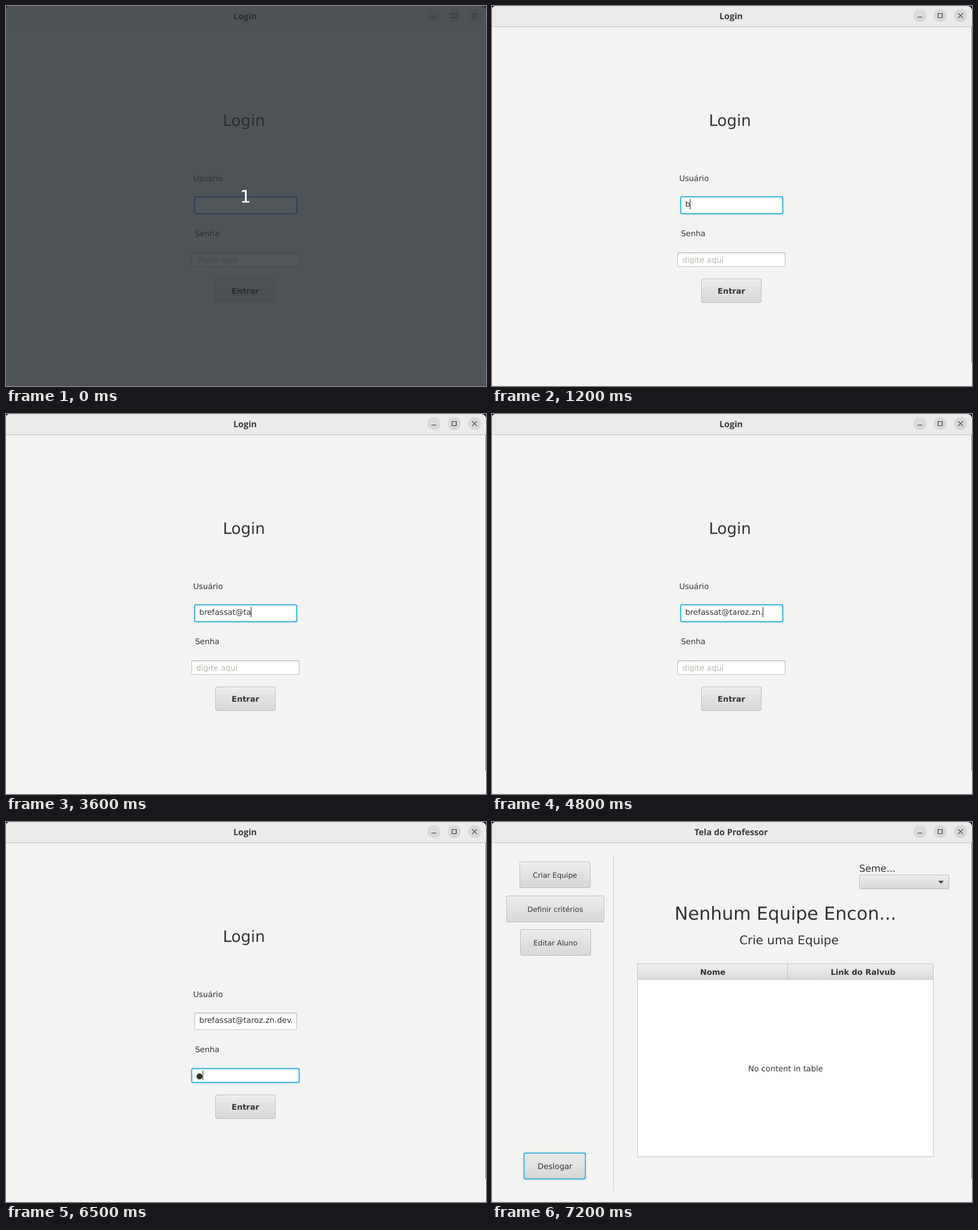
These frames come from a looping animation (800 px wide and 634 px high, 8000 ms). An HTML page:

```html
<!DOCTYPE html>
<html lang="pt">
<head>
<meta charset="utf-8">
<title>Login</title>
<style>
html, body { margin: 0; width: 100%; height: 100%; overflow: hidden; background: #1c1c1c; }
svg { display: block; width: 800px; height: 634px; }
text { font: 13px "DejaVu Sans", sans-serif; fill: #333; text-rendering: geometricPrecision; white-space: pre; }
.bold { font-weight: bold; }
.mid { text-anchor: middle; }
.title { font: bold 14.4px "Open Sans", sans-serif; fill: #3a3a3a; }
.icon { fill: none; stroke: #3a3a3a; stroke-width: 1.2; }
.off { display: none; }
.ring { fill: #039ed3; }
.dim .ring { fill: #1464ff; }
</style>
</head>
<body>
<svg id="stage" viewBox="0 0 800 634" xmlns="http://www.w3.org/2000/svg"></svg>
<script>
const grad = (id, ...stops) => `<linearGradient id="${id}" x2="0" y2="1">` +
  stops.map(([at, c]) => `<stop offset="${at}" stop-color="${c}"/>`).join('') + '</linearGradient>';

const clip = (id, x, y, w, h) =>
  `<clipPath id="${id}"><rect x="${x}" y="${y}" width="${w}" height="${h}"/></clipPath>`;

const label = (str, x, y, size = 13, cls = '', id = '') =>
  `<text id="${id}" class="${cls}" x="${x}" y="${y}"${size === 13 ? '' : ` style="font-size:${size}px"`}>${str}</text>`;

// Stacked rounded rectangles; each layer is [inset, radius, fill].
const layers = (x, y, w, h, list) => list.map(([i, r, fill]) =>
  `<rect x="${x + i}" y="${y + i}" width="${w - 2 * i}" height="${h - 2 * i}" rx="${r}" ` +
  (fill === 'ring' ? 'class="ring"/>' : `fill="${fill}"/>`)).join('');

const group = (id, inner, cls = '') => `<g id="${id}" class="${cls}">${inner}</g>`;

const white = '#fffffe', halo = 'rgba(3,158,211,.133)';
const field = (...r) => layers(...r, [[0, 3, 'url(#edge)'], [1, 2, 'url(#inner)']]);
const fieldFocus = (...r) => layers(...r, [[-.2, 3, 'ring'], [1, 2, white], [-1.4, 4, halo], [3, 0, white]]);
const button = (...r) => layers(...r, [[0, 3, '#b4b4b2'], [1, 2, 'url(#shine)'], [2, 1, 'url(#face)']]);
const buttonFocus = (face, ...r) => layers(...r,
  [[-.2, 3, 'ring'], [1, 2, 'url(#shine)'], [2, 1, face], [-1.4, 4, halo], [2.6, 1, face]]);

const userBox = [314, 318, 171, 29], passBox = [309, 411, 180, 24], enterBox = [349, 455, 100, 40];

const defs = '<defs>' +
  grad('edge', [0, '#b3b3b1'], [1, '#c6c6c4']) +
  grad('inner', [0, '#ebebea'], [.2, white]) +
  grad('shine', [0, '#fbfbfa'], [1, '#dfdfdd']) +
  grad('face', [0, '#ebebe9'], [1, '#d8d8d6']) +
  grad('pressed', [0, '#dadad8'], [1, '#c9c9c7']) +
  grad('head', [0, '#efefed'], [1, '#dbdbd9']) +
  clip('userClip', 322, 318, 155, 29) + clip('passClip', 317, 411, 164, 24) + '</defs>';

const chrome =
  '<rect width="800" height="634" fill="#1c1c1c"/>' +
  '<rect x="-2" width="802" height="660" rx="9" fill="#f3f3f1"/>' +
  '<path d="M0 34V4Q2 0 7 0H791Q800 0 800 9V34Z" fill="#ebebe9"/>' +
  '<rect y="34" width="800" height="1" fill="#bfbfbd"/>' +
  '<rect x="799" y="35" width="1" height="560" fill="#858583"/>' +
  [713, 747, 781].map(x => `<circle cx="${x}" cy="16" r="11" fill="#d9d9d7"/>`).join('') +
  '<path class="icon" d="M709 18.5h8M743.5 12.5h7v7h-7zM777.2 12.2l7.6 7.6M784.8 12.2l-7.6 7.6"/>' +
  label('Login', 398.5, 22, 13, 'title mid', 'title');

const login = group('login',
  label('Login', 361.5, 200, 26) +
  label('Usuário', 312, 292) +
  group('userIdle', field(...userBox)) + group('userFocus', fieldFocus(...userBox)) +
  '<g clip-path="url(#userClip)">' + label('', 322, 335, 13, '', 'user') +
  '<rect id="caret" y="322" width="1" height="17" fill="#222"/></g>' +
  label('Senha', 315, 384) +
  group('passIdle', field(...passBox)) + group('passFocus', fieldFocus(...passBox)) +
  group('prompt', '<text x="317" y="428" style="fill:#b4b6ac">digite aqui</text>') +
  '<circle id="dot" cx="322.5" cy="424.5" r="5" fill="#333"/>' +
  '<g clip-path="url(#passClip)"><rect id="passCaret" y="415" width="1" height="16" fill="#222"/></g>' +
  group('enterIdle', button(...enterBox)) +
  group('enterFocus', buttonFocus('url(#face)', ...enterBox)) +
  group('enterDown', buttonFocus('url(#pressed)', ...enterBox)) +
  label('Entrar', 399, 480, 13, 'bold mid'));

const home = group('home',
  button(46, 66, 118, 44) + label('Criar Equipe', 105, 93, 12, 'mid') +
  button(24, 123, 163, 44) + label('Definir critérios', 105.3, 150, 12, 'mid') +
  button(47, 179, 118, 44) + label('Editar Aluno', 105.7, 206, 12, 'mid') +
  buttonFocus('url(#face)', 53, 552, 103, 44) + label('Deslogar', 105, 579, 13, 'mid') +
  '<rect x="202" y="57" width="1" height="558" fill="#c8c8c6"/>' +
  label('Seme...', 612, 83, 16) +
  button(612, 88, 150, 24) + '<path d="M743.5 98h9.5l-4.75 5z" fill="#484848"/>' +
  label('Nenhum Equipe Encon...', 489, 163, 30, 'mid') +
  label('Crie uma Equipe', 495, 204, 20, 'mid') +
  layers(242, 236, 494, 323, [[0, 0, '#c4c4c2'], [1, 0, white]]) +
  '<rect x="243" y="237" width="492" height="25" fill="url(#head)"/>' +
  '<path d="M243 262.5h492M492.5 237v26" stroke="#c0c0be"/>' +
  label('Nome', 368, 255, 13, 'bold mid') +
  label('Link do Ralvub', 618.5, 255, 13, 'bold mid') +
  label('No content in table', 489.3, 416, 13, 'mid'));

const shade = group('shade',
  '<rect width="800" height="634" fill="rgba(38,44,51,.8)"/>' +
  '<text x="390" y="328" style="font-size:29px;fill:#fff">1</text>');

const stage = document.getElementById('stage');
stage.innerHTML = defs + chrome + login + home + shade;

const el = id => document.getElementById(id);
const show = (id, on) => el(id).classList.toggle('off', !on);
const setText = (id, str) => { if (el(id).textContent !== str) el(id).textContent = str; };

const email = 'brefassat@taroz.zn.dev.br';
const keys = [1200, 1300, 1500, 1700, 1800, 2000, 2200, 2300, 2700, 3200, 3500, 3600, 3900,
  4000, 4200, 4300, 4400, 4500, 4800, 4900, 5100, 5300, 5400, 5500, 5600];
const LOOP = 8000, room = 155;

function typeUser(t) {
  const typed = keys.filter(k => t >= k).length;
  setText('user', email.slice(0, typed));
  const width = typed ? el('user').getComputedTextLength() : 0;
  const x = 322 + (t < 6200 ? Math.min(0, room - width) : 0);
  el('user').setAttribute('x', x);
  el('caret').setAttribute('x', x + width - .5);
  show('caret', (t >= 400 && t < 900) || (t >= 1200 && t < 5600));
}

function render(t) {
  const dim = t < 100, onUser = t < 6200, onPass = !onUser && t < 6800, atHome = t >= 7200;
  stage.classList.toggle('dim', dim);
  show('shade', dim);
  show('login', !atHome);
  show('home', atHome);
  setText('title', t < 7100 ? 'Login' : 'Tela do Professor');
  if (atHome) return;
  typeUser(t);
  show('userIdle', !onUser);
  show('userFocus', onUser);
  show('passIdle', !onPass);
  show('passFocus', onPass);
  show('prompt', onUser);
  show('dot', t >= 6500);
  show('passCaret', onPass);
  el('passCaret').setAttribute('x', t < 6500 ? 316.5 : 327.5);
  show('enterIdle', t < 6800);
  show('enterFocus', t >= 6800 && t < 6900);
  show('enterDown', t >= 6900);
}

const start = performance.now();
function tick() {
  render((performance.now() - start) % LOOP);
  requestAnimationFrame(tick);
}
tick();
</script>
</body>
</html>
```
